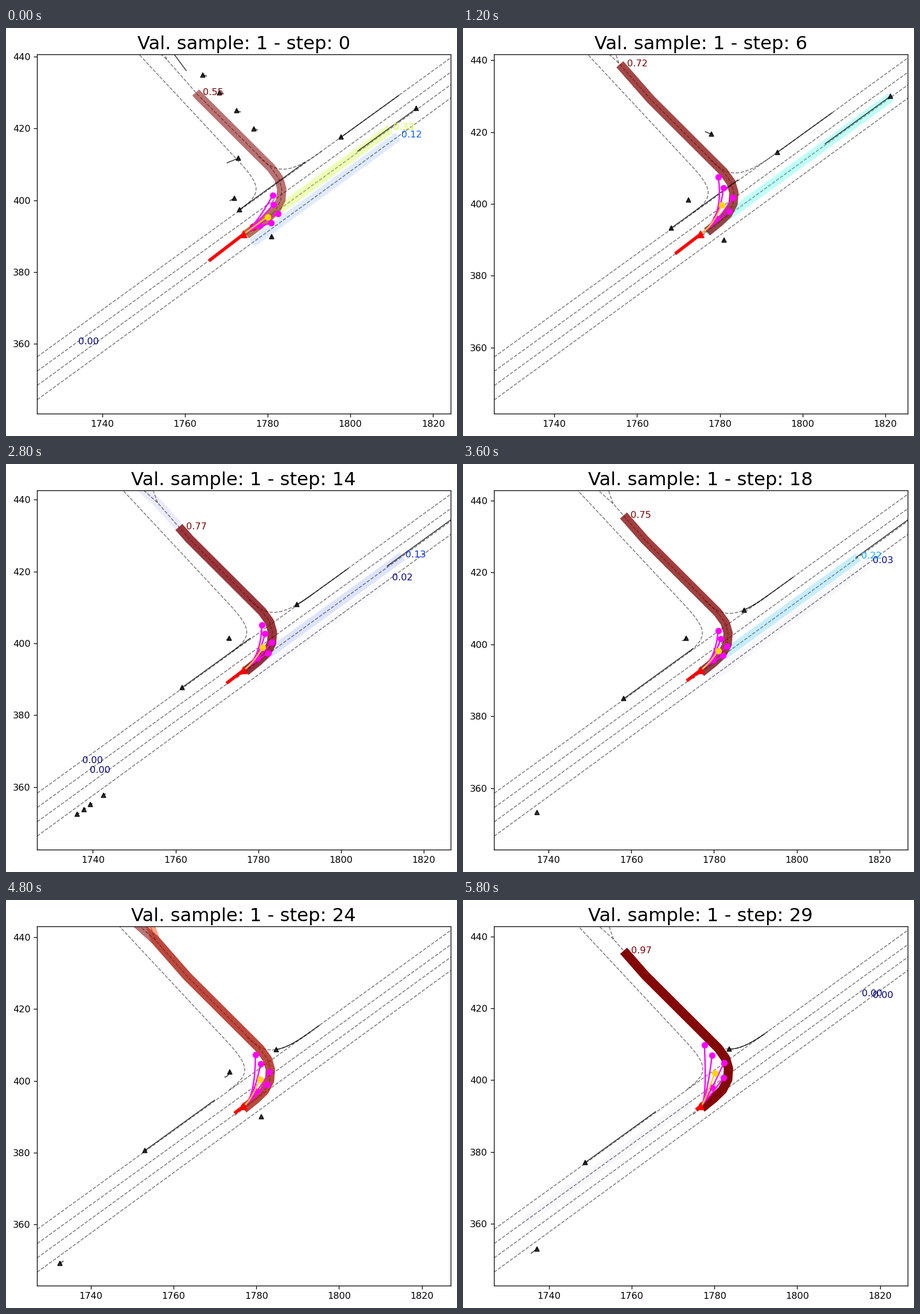
Recreate the animation shown at these times as a matplotlib script. Size 786 by 712 pixels, loop 6 s.

```python
import numpy as np
import matplotlib.pyplot as plt
from matplotlib.animation import FuncAnimation

W, H, DPI = 786, 712, 116.3
STEPS, PAST = 30, 20
plt.rcParams["font.family"] = "DejaVu Sans"

# --- road map -------------------------------------------------------------


def lane_y(x, left, right):
    """Height of a lane given its heights at x = 1724.2 and x = 1824.2."""
    return left + (right - left) * (x - 1724.2) / 100


def straight(left, right):
    x = np.array([1715.0, 1835.0])
    return np.column_stack([x, lane_y(x, left, right)])


def corner(start, tip, end, pull):
    """Rounded corner between two straight roads that meet at tip."""
    a, c, b = map(np.array, (start, tip, end))
    t = np.linspace(0, 1, 21)[:, None]
    p, q = a + pull * (c - a), b + pull * (c - b)
    return (1 - t)**3 * a + 3 * t * (1 - t)**2 * p + 3 * t**2 * (1 - t) * q + t**3 * b


TOP, SECOND, THIRD, LOW = EDGES = [
    (356.35, 439.6), (352.36, 435.6), (348.37, 432.1), (344.39, 428.4)]
BACK, AHEAD, SIDE = straight(*SECOND), straight(*THIRD), straight(*LOW)

TURN = [(1774.8, 390.4), (1776.9, 392.2), (1779.8, 394.9), (1781.9, 397.2),
        (1783.2, 400.1), (1783.4, 403.2), (1782.7, 406.0), (1780.9, 408.9),
        (1763.3, 429.1), (1755.6, 439.2)]
LEFT = np.array(TURN + [(1749.5, 445.5)])
RIGHT = np.array(TURN + [(1753.7, 445.5)])
EXIT = np.vstack([(1745, 445.4),
                  corner((1772.7, 411.2), (1779.6, 402.7), (1773.2, 397.3), .85)])
MERGE = corner((1777.7, 412.3), (1783.4, 405.6), (1793, 413.6), .78)
ROADS = [straight(*e) for e in EDGES] + [LEFT, RIGHT[-2:], EXIT, MERGE]

# --- agents as functions of the step --------------------------------------

KNOTS = [-20, 0, 10, 18, 29]
EGO_RUN = np.polyfit(KNOTS, [-8.1, 0, 1.78, 2.58, 2.47], 4)
SLOWING = np.polyfit(KNOTS, [13.94, 0, -6.2, -10.53, -14.18], 4)
MERGE_ROUTE = np.vstack([MERGE, straight(*TOP)[1]])


def ego(s):
    run = np.polyval(EGO_RUN, s)
    return 1774.2 + run, 390.56 + .885 * run


def oncoming(s):
    x = 1773.16 - .812 * s - .001 * s**2
    return x, lane_y(x, *TOP) + .25


def turning(s):
    x = 1797.78 + np.polyval(SLOWING, s)
    return x, np.interp(x, *MERGE_ROUTE.T)


def leading(s):
    x = 1815.95 + .836 * s + .0063 * s**2
    return x, lane_y(x, *THIRD) + .35


def walker(s):
    return 1772.45 + .064 * (s - 6), 401.1 + .0045 * (s - 6)**2


# motion, first step, last step, earliest known step
AGENTS = [(oncoming, 0, 29, -20), (turning, 0, 29, -20),
          (leading, 0, 20, -20), (walker, 5, 26, 5)]

# Briefly seen agents: first step, last step, head, tail offset
PARKED = [(0, 3, (1764.3 + 4.1 * i, 434.9 - 5 * i), (.9, -.3)) for i in range(4)]
QUEUE = [(13, 15, (1736.2 + 1.6 * i, 352.4 + 1.35 * i), (.4, .3)) for i in (0, 1, 2, 4)]
BRIEF = PARKED + QUEUE + [
    (0, 3, (1756.5, 442), (3.8, -5.9)),
    (0, 3, (1772.9, 411.7), (-2.7, -1.3)),
    (0, 4, (1771.9, 400.5), (-1, -.6)),
    (0, 7, (1781, 389.9), (-.3, -.2)),
    (4, 7, (1778, 419.4), (-1.5, .7)),
    (17, 19, (1737.2, 353.2), (0, 0)),
    (23, 25, (1781.2, 390), (0, 0)),
    (23, 25, (1732.5, 349.2), (.8, .6)),
    (28, 29, (1737.1, 353), (-1.4, -1.2)),
]

# --- predictions ----------------------------------------------------------

KEYS = [0, 6, 10, 14, 18, 24, 29]
P_TURN = [.55, .72, .55, .77, .75, .54, .97]
P_AHEAD = [.33, .27, .27, .13, .22, 0, 0]
TURN_END = [430, 438.9, 432.4, 432.4, 435.9, 445.5, 436]

PHASES = [0, 6, 18, 29]
REACH, LEAD, BEND = [12.9, 16.4, 11.8, 17], [57, 75, 69, 87], [.3, .45, .4, .12]
# share of the reach, degrees right of the leading plan; the chosen one is last
FAN = [(1, 0), (.85, 8), (.78, 22), (.57, 32), (.35, 25), (.58, 17)]
HEADING = np.array([.77, .64])

# Labels of routes that are all but ruled out
IDLE = [(0, 3, 1734.2, 359.9), (8, 15, 1737.4, 366.6), (8, 15, 1739.3, 363.9),
        (27, 29, 1815.6, 423.4), (27, 29, 1818.3, 422.8)]


def cut(path, y0, y1):
    """Part of a path between two heights."""
    x, y = path.T
    ys = np.concatenate([[y0], y[(y > y0) & (y < y1)], [y1]])
    return np.column_stack([np.interp(ys, y, x), ys])


def routes(step, ego_y):
    """Probability, path and label offset of each route."""
    turn, ahead = np.interp(step, KEYS, P_TURN), np.interp(step, KEYS, P_AHEAD)
    left = .1 - .005 * (step - 10) if 8 <= step < 16 else 0
    rest = 1 - turn - ahead - left
    start = 390.4 if step < 3 else 392.2
    end = np.interp(step, [0, 6, 10], [419.9, 429.7, 424.3])
    found = [(turn, cut(LEFT, start, np.interp(step, KEYS, TURN_END)), (1.75, -.65)),
             (ahead, cut(AHEAD, start, end), (.7, -.4)),
             (left, cut(LEFT, start, 445.5), None)]
    if step < 20:
        side = cut(SIDE, ego_y - 2.5, 417.8 if step < 16 else 422.9)
        found.append((rest, side, (.7, -.3)))
    elif step < 27:
        found.append((rest, cut(RIGHT, start, 445.5), None))
    else:
        found.append((rest, cut(BACK, 360.3, 394.2), None))
    return sorted((r for r in found if r[0] > .015), key=lambda r: r[0])


# --- drawing --------------------------------------------------------------

fig = plt.figure(figsize=((W + .001) / DPI, (H + .001) / DPI), dpi=DPI, facecolor="white")
ax = fig.add_axes([53.8 / W, 1 - 673.1 / H, 720.9 / W, 626.8 / H])


def line(pts, **style):
    ax.plot(*np.asarray(pts).T, **style)


def dot(p, color, size, marker="o", **style):
    ax.plot(*p, color=color, ms=size, marker=marker, **style)


def track(motion, first, last):
    return np.column_stack(motion(np.arange(first, last + 1)))


def agent(pts):
    line(pts, color="black", lw=1, alpha=.75)
    dot(pts[-1], "black", 5, "^", alpha=.8)


def draw_routes(step, here):
    found = routes(step, here[1])
    best = found[-1][0]
    for p, pts, off in found:
        color = plt.cm.jet(float(p / best))
        line(pts, color=color, lw=10, alpha=p, solid_capstyle="butt")
        if off is None:
            continue
        x, y = pts[-1] + off
        if x - here[0] < 45 and y - here[1] < 48.5:
            ax.text(x, y, f"{p:.2f}", color=color)
    for first, last, x, y in IDLE:
        if first <= step <= last:
            ax.text(x, y, "0.00", color=plt.cm.jet(0.0))


def draw_plans(step, here):
    reach, lead, bend = (np.interp(step, PHASES, v) for v in (REACH, LEAD, BEND))
    t = np.linspace(0, 1, 25)[:, None]
    for share, turn in FAN:
        r, a = share * reach, np.radians(lead - turn)
        end = r * np.array([np.cos(a), np.sin(a)])
        pts = here + 2 * t * (1 - t) * bend * r * HEADING + t**2 * end
        color = "gold" if (share, turn) == FAN[-1] else "magenta"
        line(pts, color=color, lw=1.5)
        dot(pts[-1], color, 6)


def draw(step):
    ax.clear()
    here = np.array(ego(step))
    for road in ROADS:
        line(road, color="black", lw=1, ls="--", alpha=.5)
    draw_routes(step, here)

    for motion, first, last, birth in AGENTS:
        if first <= step <= last:
            agent(track(motion, max(step - PAST, birth), step))
    for first, last, head, tail in BRIEF:
        if first <= step <= last:
            agent([np.add(head, tail), head])

    line(track(ego, step - PAST, step), color="red", lw=3.5)
    if step == 0:
        future = track(ego, 0, STEPS)
        line(future, color="red", lw=1.5)
        dot(future[-1], "red", 7)
    draw_plans(step, here)
    dot(here, "red", 8, "^")

    ax.set_xticks(range(1740, 1821, 20))
    ax.set_yticks(range(360, 441, 20))
    ax.set_xlim(here[0] - 50, here[0] + 50)
    ax.set_ylim(here[1] - 50, here[1] + 50)
    ax.set_title(f"Val. sample: 1 - step: {step}", fontsize=20)
    return []


anim = FuncAnimation(fig, draw, frames=STEPS, interval=200, repeat=True)
plt.show()
```
